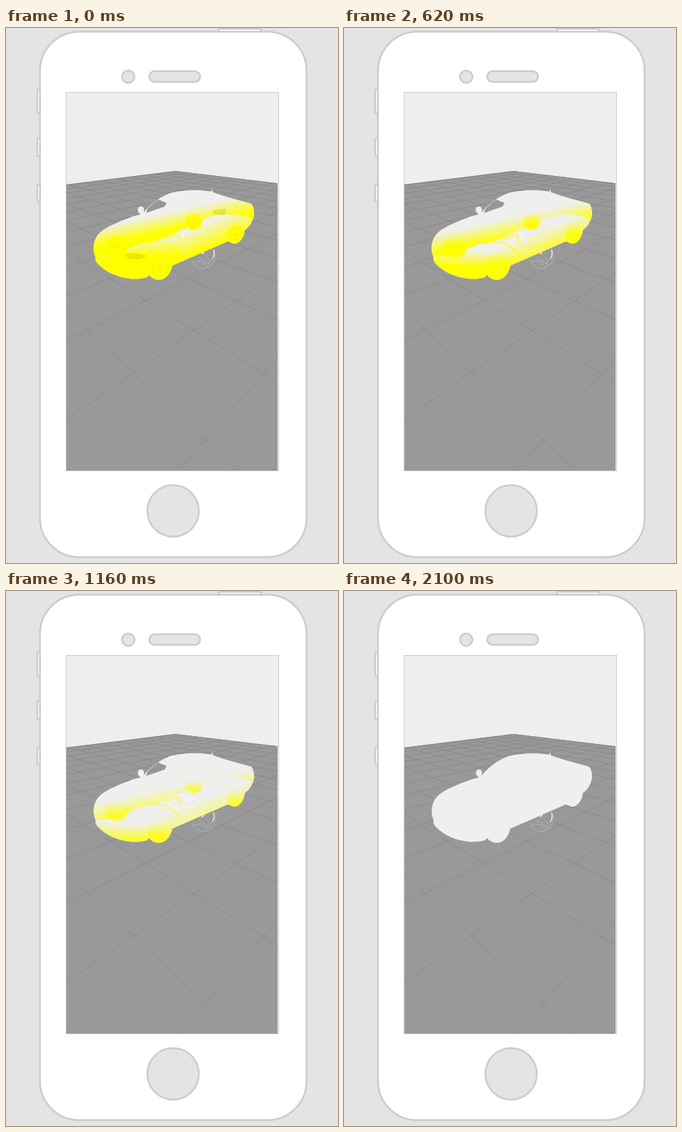
Animation of 467x752 px, one loop 3190 ms. Source, as an HTML page with a canvas:

```html
<!DOCTYPE html>
<html lang="en">
<head>
<meta charset="utf-8">
<title>Car on a phone screen</title>
<style>
html, body { margin: 0; width: 100%; height: 100%; overflow: hidden; background: #e4e4e4; }
canvas { display: block; }
</style>
</head>
<body>
<canvas id="stage" width="467" height="752"></canvas>
<script>
const ctx = document.getElementById('stage').getContext('2d');
const LOOP = 3190, SOLID = 2100;
const STEPS = [0, 90, 170, 240, 320, 390, 470, 550, 620, 780, 860, 930, 1010, 1080, 1160,
  1310, 1390, 1470, 1550, 1620, 1700, 1780, 1870, 1940, SOLID];
const PALE = '#efefee', LINE = '#ccc';

const body = new Path2D('M124 316C122 304 125 294 133 287C142 279 160 272 178 265L190 262' +
  'C184 259 184 251 190 251C194 251 195 256 193 260C202 249 214 239 229 233' +
  'C244 228 270 227 289 230L290 226L291 231C304 236 330 243 345 247Q349 252 349 262' +
  'Q347 276 336 284C335 295 327 305 319 303L312 300L234 334C231 347 223 355 213 354' +
  'Q206 353 201 347L199 350C182 356 156 351 141 341C131 334 124 328 126 322Z');
const pane = new Path2D('M197 260L199 254Q207 246 214 241L226 246L223 251Z');
const shell = new Path2D('M118 220H352V272Q340 262 312 262Q286 262 272 274Q252 282 238 288' +
  'L205 302Q188 302 172 312Q150 325 118 320Z');
const front = new Path2D('M118 314H172L205 298L240 286L250 326L234 334L200 360H118Z');
const streak = new Path2D('M205 300Q230 299 246 318M222 297L243 290L247 304');
const shade = new Path2D('M166 318Q184 314 198 320Q190 328 172 324ZM290 256L310 254L308 263L292 262Z');
const frame = new Path2D('M219 299C211 290 216 279 226 280C236 281 238 292 230 299M221 288L262 309' +
  'M229 281L270 295L281 307M228 299L266 323M236 290L246 286L262 298M243 304L268 303M258 316L276 309');
const spark = new Path2D('M241 291L248 281M238 286L250 293M246 301L250 287');
const under = new Path2D('M262 326C265 338 279 341 288 335C295 329 296 317 291 309' +
  'M263 330Q276 323 283 336M271 322L289 334M277 318Q285 320 287 331');
const glint = new Path2D('M292 312Q294 319 290 325M279 315L275 318');
const WHEELS = [[156, 307, 17, 16], [264, 272, 12, 12], [217, 336, 17, 18], [323, 289, 12, 14]];

function fill(path, color) {
  ctx.fillStyle = color;
  ctx.fill(path);
}

function stroke(path, color, width) {
  ctx.strokeStyle = color;
  ctx.lineWidth = width;
  ctx.stroke(path);
}

// Yellow ramp; its level lines satisfy k * x + y = constant.
function ramp(k, from, to, alpha) {
  const n = 1 + k * k;
  const g = ctx.createLinearGradient(k * from / n, from / n, k * to / n, to / n);
  g.addColorStop(0, 'rgba(255,255,0,0)');
  g.addColorStop(1, `rgba(255,255,0,${alpha})`);
  return g;
}

function rounded(x, y, w, h, r) {
  const p = new Path2D();
  p.roundRect(x, y, w, h, r);
  fill(p, ctx.fillStyle);
  stroke(p, LINE, 2.5);
}

function phone() {
  ctx.fillStyle = '#e4e4e4';
  ctx.fillRect(0, 0, 467, 752);
  ctx.fillStyle = '#fff';
  rounded(299.5, 1.2, 59, 10, 1);
  for (const [y, h] of [[86.5, 33], [155, 25], [220, 24]]) rounded(44, y, 10, h, 1);
  rounded(47.8, 5.2, 375, 738.5, 55);
  ctx.fillStyle = '#e4e4e4';
  rounded(163.2, 59.8, 17.5, 17.5, 8.75);
  rounded(201.5, 60.7, 71.5, 15, 7.5);
  rounded(198.8, 642.5, 72.5, 72.5, 36.25);
  ctx.fillStyle = '#eee';
  ctx.fillRect(85, 91, 298, 531);
}

function floor() {
  const horizon = 149.5, base = 622;
  const grid = new Path2D();
  const family = (vx, x0, gap) => {
    for (let i = 0; i < 14; i++) {
      grid.moveTo(vx, horizon);
      grid.lineTo(x0 + i * gap, base);
    }
  };
  family(660, 242, -260);
  family(-180, 326, 256);
  const ground = new Path2D('M238 201L382 218.3V622H85V220Z');
  ctx.save();
  fill(ground, '#999');
  ctx.clip(ground);
  stroke(grid, '#8b8b8b', 0.9);
  stroke(new Path2D('M85 220L238 201L382 218.3'), '#888', 1.5);
  ctx.restore();
  ctx.strokeStyle = LINE;
  ctx.lineWidth = 1;
  ctx.strokeRect(84.5, 90.5, 299, 532);
}

function wheel([x, y, rx, ry], shift, alpha, detail) {
  const p = new Path2D();
  p.ellipse(x, y, rx, ry, 0, 0, 7);
  const top = y - 1.6 * ry + shift * ry / 15;
  fill(p, ramp(0, top, top + 1.3 * ry, alpha));
  const rim = new Path2D();
  rim.ellipse(x, y, rx * 0.68, ry * 0.68, 0, 0, 7);
  for (let i = 0; i < 5; i++) {
    const a = i * Math.PI * 0.4 + 0.3;
    rim.moveTo(x, y);
    rim.lineTo(x + Math.cos(a) * rx * 0.6, y + Math.sin(a) * ry * 0.6);
  }
  stroke(rim, `rgba(215,215,20,${0.4 * detail})`, 0.8);
}

function car(t) {
  stroke(under, 'rgba(225,225,225,.6)', 0.6);
  stroke(glint, '#f4f4f4', 1.3);
  fill(body, PALE);
  if (t >= SOLID) return;

  const shift = 0.015 * t;
  const alpha = 1 - (t / 2000) ** 3;
  const detail = Math.max(0, 1 - t / 1300);
  ctx.save();
  ctx.clip(body);
  fill(body, ramp(0.41, 388 + shift, 426 + shift, alpha * alpha));
  fill(front, ramp(-0.1, 275 + 2 * shift, 300 + 2 * shift, alpha));
  stroke(streak, `rgba(255,255,0,${0.55 * alpha * alpha})`, 3);
  fill(shell, PALE);
  fill(shell, ramp(0.22, 308 + shift, 335 + shift, alpha * alpha));
  for (const w of WHEELS) wheel(w, shift, alpha, detail);
  fill(shade, `rgba(190,190,0,${0.35 * Math.max(0, 1 - t / 450)})`);
  stroke(spark, `rgba(255,255,255,${0.8 * detail})`, 1);
  stroke(frame, `rgba(255,255,255,${0.9 * Math.min(1, (t / 1600) ** 2)})`, 1);
  ctx.restore();
  fill(pane, '#979797');
}

function draw() {
  const now = performance.now() % LOOP;
  phone();
  floor();
  car(STEPS.findLast(s => s <= now));
  requestAnimationFrame(draw);
}
draw();
</script>
</body>
</html>
```
